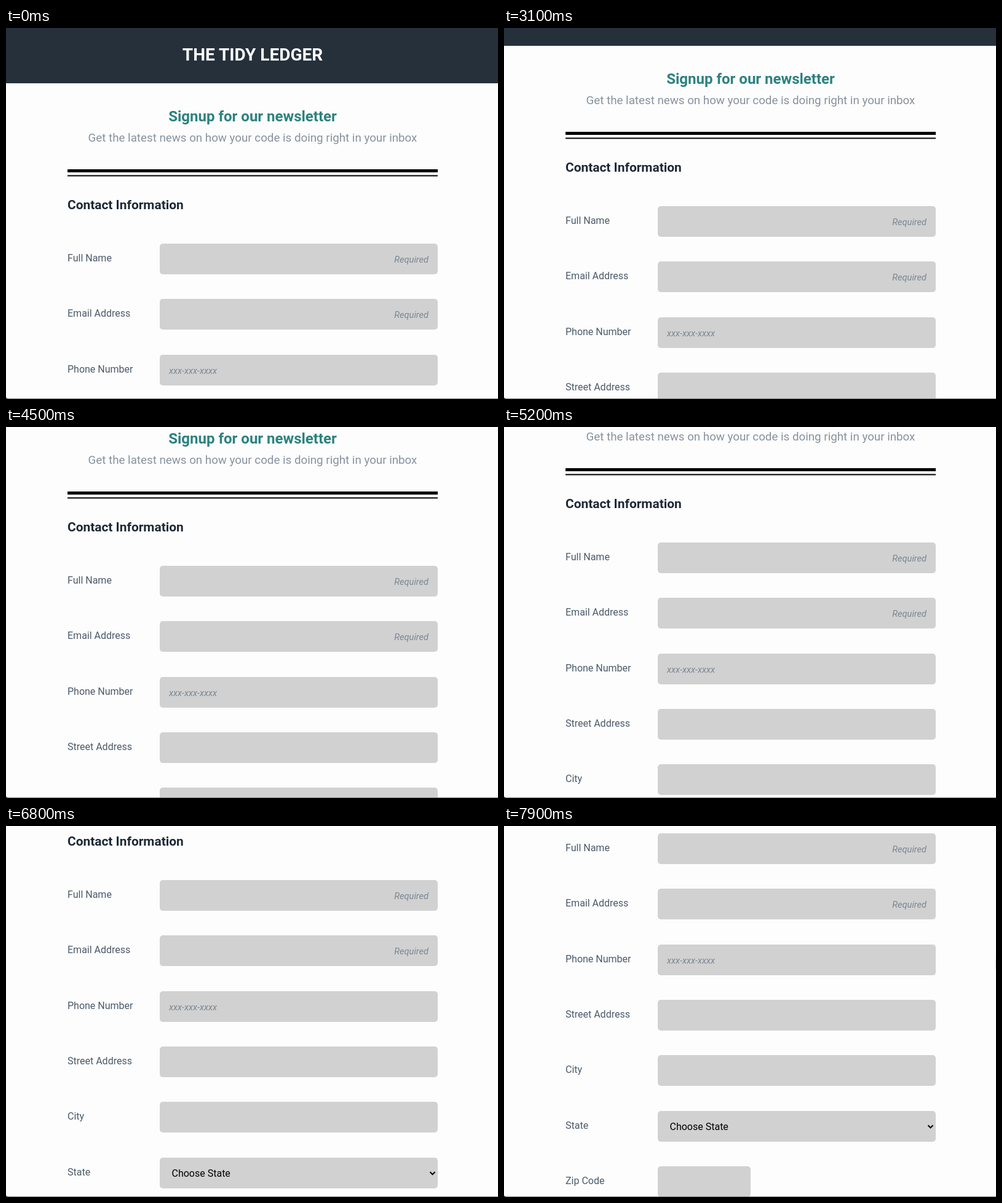
Animation of 800 by 604 pixels, one loop 8000 ms. Source, as an HTML page:

```html
<!DOCTYPE html>
<html lang="en">
<head>
<meta charset="utf-8">
<title>Newsletter signup</title>
<style>
  html, body { margin: 0; width: 100%; height: 100%; overflow: hidden; background: #fdfdfd; }
  svg { display: block; width: 100%; height: 100%; font: 16px Roboto, sans-serif; }
  .middle { text-anchor: middle; }
  .bold { font-weight: 700; }
  .label { fill: #4c5a69; }
  .hint { font-size: 14.6px; font-style: italic; fill: #7b8794; }
  .field { fill: #d1d1d1; }
</style>
</head>
<body>
<svg viewBox="0 0 800 604">
  <g id="page">
    <rect width="800" height="90" fill="#25303b"/>
    <text class="middle bold" x="401" y="53" font-size="28" fill="#fdfdfd">THE TIDY LEDGER</text>
    <text class="middle bold" x="401" y="151.5" font-size="24" fill="#2c827f">Signup for our newsletter</text>
    <text class="middle" x="401" y="184.5" font-size="18.75" fill="#87929e">Get the latest news on how your code is doing right in your inbox</text>
    <path d="M100 230h602v5H100zM100 239.5h602v2H100z"/>
    <text class="bold" x="100" y="295" font-size="20.9" fill="#1e2935">Contact Information</text>
    <g id="form"></g>
  </g>
  <path id="cursor" d="M0 0V16.5L3.8 13L6.4 19L9 18L6.5 12H11.5Z" stroke="#fff" stroke-width="1"/>
  <rect id="edge" x="798.5" y="217" width="1.5" height="17" fill="#ececec"/>
  <path d="M0 603h800v1H0z" fill="#828282"/>
  <path d="M0 600Q0 604 4 604H0z"/>
</svg>
<script>
const LOOP = 8000, STEP = 100;
const FIRST_ROW = 351, ROW_PITCH = 90.33;
const byId = id => document.getElementById(id);

const required = '<text class="hint" x="687" y="31" text-anchor="end">Required</text>';
const rows = [
  ['Full Name', required],
  ['Email Address', required],
  ['Phone Number', '<text class="hint" x="265" y="31">xxx-xxx-xxxx</text>'],
  ['Street Address'],
  ['City'],
  ['State', '<text x="269.5" y="31">Choose State</text>' +
    '<path d="M689.5 23.3l4 4 4-4" fill="none" stroke="#000" stroke-width="2"/>'],
  ['Zip Code', '', 151]
];

byId('form').innerHTML = rows.map(([label, content = '', width = 452], i) => `
  <g transform="translate(0 ${FIRST_ROW + Math.round(i * ROW_PITCH)})">
    <text class="label" x="100" y="29.3">${label}</text>
    <rect class="field" x="250" width="${width}" height="50" rx="5"/>
    ${content}
  </g>`).join('');

// Scroll offset at given times, joined by straight lines
const scrollKeys = [[0, 0], [1600, 0], [3100, 61], [3900, 93], [5200, 163], [6800, 263], [7900, 339]];

function valueAt(keys, time) {
  const next = keys.findIndex(([t]) => t > time);
  if (next < 0) return keys[keys.length - 1][1];
  const [t0, v0] = keys[next - 1], [t1, v1] = keys[next];
  return v0 + (v1 - v0) * (time - t0) / (t1 - t0);
}

function show(id, visible) {
  byId(id).setAttribute('visibility', visible ? 'visible' : 'hidden');
}

const start = performance.now();
function draw() {
  const elapsed = (performance.now() - start) % LOOP;
  const time = Math.floor(elapsed / STEP) * STEP;
  byId('page').setAttribute('transform', `translate(0 ${-Math.round(valueAt(scrollKeys, time))})`);

  // The pointer peeks in from the right and leaves again
  const cursorX = 793.5 + Math.abs(time - 1400) / 25;
  byId('cursor').setAttribute('transform', `translate(${cursorX} 138)`);
  show('cursor', cursorX < 800);
  show('edge', time >= 7900);
  requestAnimationFrame(draw);
}
draw();
</script>
</body>
</html>
```
